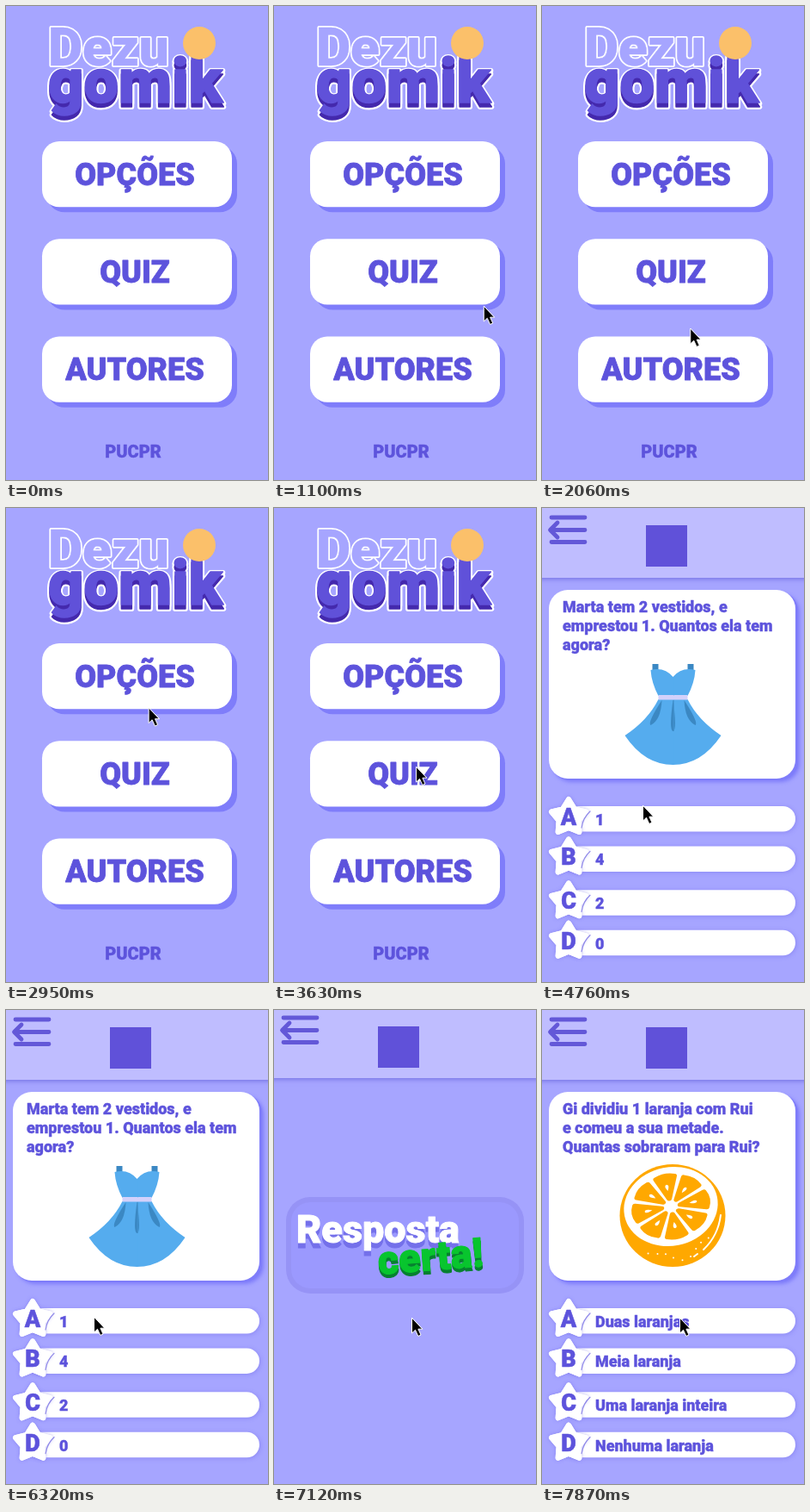
Recreate the animation shown at these times as an HTML page with a canvas. Size 305 by 550 pixels, loop 8 s.

```html
<!DOCTYPE html>
<html lang="pt">
<head>
<meta charset="utf-8">
<title>Quiz</title>
<style>
html, body { margin: 0; width: 100%; height: 100%; overflow: hidden; background: #a6a5ff; }
canvas { display: block; width: 305px; height: 550px; }
</style>
</head>
<body>
<canvas id="stage"></canvas>
<script>
const W = 305, H = 550, LOOP = 8000, TICK = 70;
const BG = '#a6a5ff', INK = '#5d53dc', SHADE = '#7f7dfa', WHITE = '#fff', MARK = '#6051d9';
const canvas = document.getElementById('stage');
const ctx = canvas.getContext('2d');
const dpr = window.devicePixelRatio || 1;
canvas.width = W * dpr;
canvas.height = H * dpr;

// Pointer: eased glides, each bent towards a control point, sampled once per tick.
const point = (x, y) => ({ x, y });
const middle = (p, q) => point((p.x + q.x) / 2, (p.y + q.y) / 2);
const mix = (p, q, f) => point(p.x + (q.x - p.x) * f, p.y + (q.y - p.y) * f);
const smooth = f => f * f * (3 - 2 * f);

const ENTRY = point(291, 550);
const glides = [];
function glide(start, end, to, bend) {
  const from = glides.length ? glides[glides.length - 1].to : ENTRY;
  glides.push({ start, end, from, to, bend: bend || middle(from, to) });
}
glide(70, 200, point(283, 519));
glide(400, 540, point(271, 503));
glide(750, 1520, point(170, 403), point(267, 243));
glide(1920, 2680, point(165, 216), point(179, 310));
glide(2950, 3090, point(157, 275), point(168, 246));
glide(3270, 3340, point(165, 300));
glide(4290, 4760, point(117, 345));
glide(5760, 6040, point(102, 356));
glide(6990, 7120, point(160, 357));

function pointerAt(t) {
  const g = glides.filter(m => t >= m.start).pop();
  if (!g) return null;
  const last = Math.round((g.end - g.start) / TICK);
  const step = Math.floor((t - g.start) / (g.end - g.start) * last + 0.001);
  const f = smooth(Math.min(1, (step + 1) / (last + 1)));
  return mix(mix(g.from, g.bend, f), mix(g.bend, g.to, f), f);
}

function at(x, y, draw) {
  ctx.save();
  ctx.translate(x, y);
  draw();
  ctx.restore();
}

function box(x, y, w, h, r, color) {
  ctx.fillStyle = color;
  ctx.beginPath();
  ctx.roundRect(x, y, w, h, r);
  ctx.fill();
}

function shape(d, fill, stroke, width) {
  const p = new Path2D(d);
  if (fill) { ctx.fillStyle = fill; ctx.fill(p); }
  if (stroke) { ctx.strokeStyle = stroke; ctx.lineWidth = width; ctx.stroke(p); }
}

function disc(x, y, r, color) {
  ctx.fillStyle = color;
  ctx.beginPath();
  ctx.arc(x, y, r, 0, 7);
  ctx.fill();
}

function text(s, x, y, size, color, align = 'left', edge = size / 45) {
  ctx.font = `900 ${size}px Roboto, Inter, sans-serif`;
  ctx.textAlign = align;
  ctx.fillStyle = ctx.strokeStyle = color;
  ctx.lineWidth = edge;
  ctx.strokeText(s, x, y);
  ctx.fillText(s, x, y);
}

function glow(color, blur, offset, draw) {
  ctx.save();
  ctx.shadowColor = color;
  ctx.shadowBlur = blur * dpr;
  ctx.shadowOffsetX = ctx.shadowOffsetY = offset * dpr;
  draw();
  ctx.restore();
}

function title() {
  text('Dezu', 49, 69, 62, WHITE, 'left', 4);
  text('Dezu', 49, 69, 62, BG, 'left', 0.5);
  for (const y of [117, 113]) text('gomik', 49, y, 72, WHITE, 'left', 6);
  text('gomik', 49, 117, 72, '#4429ad');
  text('gomik', 49, 112, 72, MARK);
  disc(225, 43, 19, '#fbc06a');
}

function home() {
  title();
  ['OPÇÕES', 'QUIZ', 'AUTORES'].forEach((label, i) => {
    const y = 157 + i * 113.2;
    box(48, y + 6, 221, 76.3, 20, SHADE);
    box(42, y, 221, 76.3, 20, WHITE);
    text(label, 150, y + 51, 36, INK, 'center');
  });
  text('PUCPR', 148, 524, 20, INK, 'center');
}

function header(dy) {
  glow('#6f6be0', 6, 1, () => box(-10, -10, W + 20, 91 + dy, 0, '#bfbdff'));
  at(0, dy, () =>
    shape('M11 11H50M11 39.5H50M10 25.5H50M18 17L9.5 25.5L18 34', null, '#6358d8', 4.8));
  box(121, 20 + dy / 2, 48, 48, 0, MARK);
}

function star(radius) {
  const corners = Array.from({ length: 10 }, (_, i) => {
    const r = i % 2 ? radius * 0.57 : radius, a = i * Math.PI / 5;
    return `${r * Math.sin(a)} ${-r * Math.cos(a)}`;
  });
  shape(`M${corners.join('L')}Z`, WHITE, WHITE, 6);
}

function option(letter, label, y) {
  const soft = 'rgba(110,105,230,.45)';
  glow(soft, 5, 1, () => box(22, y - 15, 273, 29.5, 14.7, WHITE));
  at(31, y - 2, () => {
    glow(soft, 4, 0, () => star(21));
    star(21);
  });
  shape(`M56 ${y - 9}Q48 ${y - 2} 46 ${y + 10}`, null, '#8e87e8', 1.2);
  text(letter, 31, y + 7, 27, INK, 'center');
  text(label, 62, y + 7, 18, INK);
}

function quiz(lines, picture, answers) {
  header(0);
  glow(SHADE, 4, 2, () => box(10, 97, 288, 219, 22, SHADE));
  box(8, 95, 287, 219, 22, WHITE);
  lines.forEach((s, i) => text(s, 24, 121 + i * 22, 18, INK));
  picture();
  answers.forEach((s, i) => option('ABCD'[i], s, 361 + i * 46.4 + (i >> 1) * 4.5));
}

function halfDress() {
  const blue = '#55acee', fold = '#3b88c3';
  shape('M17 181h7v13h-7Z', fold);
  shape('M-1 196H0Q10 184 26 188Q25 203 17 218H-1Z', blue);
  shape('M-1 222H17Q29 246 56 264Q33 298 0 298H-1Z', blue);
  shape('M-1 223H0Q5 258 0 259H-1Z', fold);
  shape('M13 223Q14 246 26 252Q30 249 13 223Z', fold);
  shape('M-1 217H17v5.5H-1Z', '#d3d1fb');
}

function dress() {
  for (const side of [1, -1]) {
    at(152.5, 0, () => {
      ctx.scale(side, 1);
      halfDress();
    });
  }
}

function orange() {
  const skin = '#ffa800';
  at(152, 238.5, () => {
    ctx.scale(61.5, 59.5);
    disc(0, 0, 1, skin);
  });
  at(150, 228, () => {
    ctx.rotate(-0.2);
    ctx.scale(1, 0.83);
    disc(0, 0, 55, WHITE);
    for (let i = 0; i < 8; i++) {
      ctx.rotate(Math.PI / 4);
      shape('M11 0L41 -11Q46 0 41 11Z', skin, skin, 6);
      shape('M22 0Q30 -4 31 0Q30 4 22 0Z', WHITE);
    }
  });
  shape('M208 238Q205 262 188 278M181 283L177 286', null, WHITE, 2);
  for (let i = 0; i < 9; i++) {
    const a = 0.55 + i * 0.2, r = 49 + 4 * Math.sin(i * 5);
    disc(152 + r * Math.cos(a), 239 + r * Math.sin(a), 1, WHITE);
  }
}

function result() {
  header(-2);
  box(14, 217, 277, 112, 28, '#9693f6');
  box(20, 223, 265, 100, 22, '#9b99fe');
  text('Resposta', 26, 276, 45, '#7470ea');
  text('Resposta', 26, 270, 45, WHITE);
  at(122, 308, () => {
    ctx.rotate(-0.08);
    text('certa!', 0, 3, 47, '#078030');
    text('certa!', 0, -1, 47, '#08c52e');
  });
}

const firstQuiz = () => quiz(
  ['Marta tem 2 vestidos, e', 'emprestou 1. Quantos ela tem', 'agora?'],
  dress, ['1', '4', '2', '0']);
const secondQuiz = () => quiz(
  ['Gi dividiu 1 laranja com Rui', 'e comeu a sua metade.', 'Quantas sobraram para Rui?'],
  orange, ['Duas laranjas', 'Meia laranja', 'Uma laranja inteira', 'Nenhuma laranja']);

function screenAt(t) {
  if (t < 3700) return home;
  if (t < 6390) return firstQuiz;
  return t < 7870 ? result : secondQuiz;
}

function render(t) {
  ctx.setTransform(dpr, 0, 0, dpr, 0, 0);
  ctx.lineJoin = ctx.lineCap = 'round';
  ctx.fillStyle = BG;
  ctx.fillRect(0, 0, W, H);
  screenAt(t)();
  const p = pointerAt(t);
  if (p) {
    at(p.x, p.y, () =>
      shape('M0.5 0.5V18L4.5 14.3L7.8 21.5L11 20L7.9 13.2H12.5Z', '#000', WHITE, 1));
  }
}

const t0 = performance.now();
function tick() {
  render((performance.now() - t0) % LOOP);
  requestAnimationFrame(tick);
}
tick();
</script>
</body>
</html>
```
